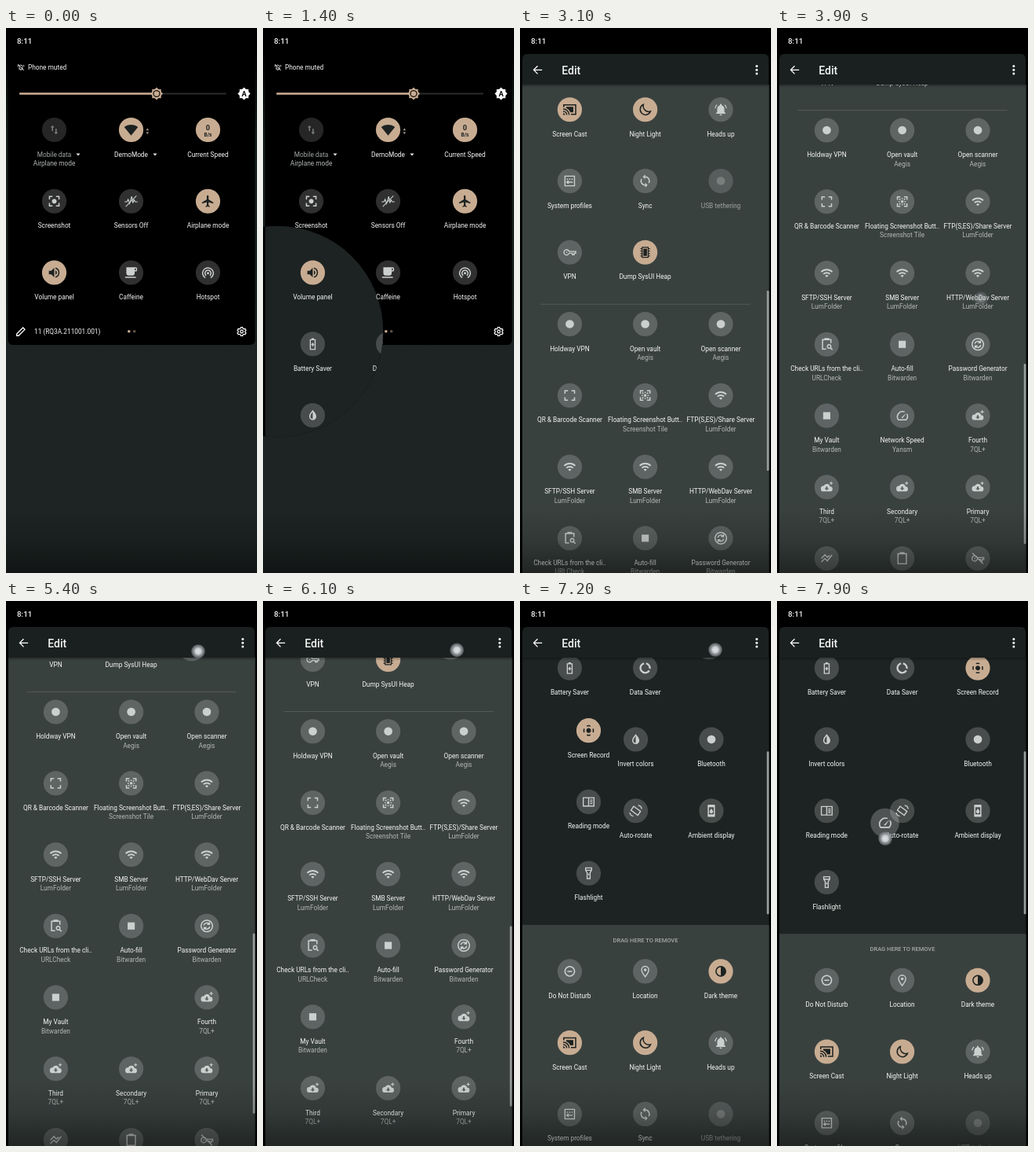
Write an HTML page that moves like this. It is 320x693 px and loops after 8 s.

```html
<!DOCTYPE html>
<html lang="en">
<head>
<meta charset="utf-8">
<title>Quick settings</title>
<style>
  html, body { margin: 0; width: 100%; height: 100%; overflow: hidden; background: #000; }
  svg { display: block; width: 100%; height: 100%; }
  text { font: 8.3px Roboto, sans-serif; fill: #f4f6f5; }
  .mid { text-anchor: middle; }
  .sub { fill: #b2b8b6; }
  .dim { fill: #a0a6a4; }
  .head { font-size: 7.5px; font-weight: 500; fill: #a3a9a7; }
  .title { font-size: 14px; font-weight: 500; }
  .clock { font-size: 9.8px; font-weight: 500; }
  .speed { font-size: 9.2px; font-weight: 700; }
  .unit { font-size: 6.5px; font-weight: 700; }
</style>
</head>
<body>
<svg id="stage" viewBox="0 0 320 693" xmlns="http://www.w3.org/2000/svg">
  <defs>
    <linearGradient id="wall" x2="0" y2="1">
      <stop offset=".04" stop-color="#000"/><stop offset=".2" stop-color="#17201d"/>
      <stop offset=".6" stop-color="#1d2423"/>
    </linearGradient>
    <linearGradient id="fade" x2="0" y2="1">
      <stop offset="0" stop-opacity="0"/><stop offset=".5" stop-opacity=".14"/>
      <stop offset="1" stop-opacity=".42"/>
    </linearGradient>
    <linearGradient id="drop" x2="0" y2="1">
      <stop offset="0" stop-opacity=".3"/><stop offset="1" stop-opacity="0"/>
    </linearGradient>
    <radialGradient id="touch">
      <stop offset="0" stop-color="#dfe2e4"/><stop offset=".4" stop-color="#cdd0d3"/>
      <stop offset=".62" stop-color="#a2a6aa" stop-opacity=".9"/>
      <stop offset="1" stop-color="#777c82" stop-opacity=".6"/>
    </radialGradient>
    <clipPath id="listClip"><rect x="3" y="72" width="314.500" height="621"/></clipPath>
    <clipPath id="revealClip"><circle id="reveal" cx="19" cy="386" r="0"/></clipPath>
  </defs>
</svg>
<script>
const LOOP = 8000, PITCH = 90.75, COLS = [63.4, 159.6, 256];
const ACCENT = '#c8ac92', DARK = '#1c2221', PALE = '#cbd0ce';
const stage = document.getElementById('stage');
const reveal = document.getElementById('reveal');

// f: filled path, s: stroked path, w: stroke width, k: scale, on a 24 unit grid
const corners = 'M4 9V4h5M15 4h5v5M20 15v5h-5M9 20H4v-5';
const keyShape = 'M11 10.5h11v3h-2.5v2.5h-3v-2.500H11a4.500 4.500 0 1 1 0-3zM6 12h2';
const plate = 'M5 4h14v17H5zM9 4V2.500h6V4';
const ring = 'M12 4a8 8 0 1 0 .1 0z';
const disc = { f: 'M12 5a7 7 0 1 0 .1 0z' };
const block = { f: 'M6 6h12v12H6z' };
const icons = {
  data: { f: 'M9 4.500L5.800 8H8v6h2V8h2.200zM15 19.500l3.200-3.500H16v-6h-2v6h-2.200z' },
  fan: { f: 'M12 21.500L.5 7.500C3.500 5 7.500 3.500 12 3.500s8.500 1.500 11.500 4z' },
  focus: { f: 'M12 8a4 4 0 1 0 .1 0z', s: corners },
  sensors: { s: 'M1 13h4l2-4 2.500 7L13 4l2 11 2-6 1.500 4H23M3 21L21 3', w: 1.4 },
  plane: { f: 'M21 16v-2l-8-5V3.500a1.500 1.500 0 0 0-3 0V9l-8 5v2l8-2.500V19l-2 1.500V22l3.500-1 3.500 1v-1.500L13 19v-5.500z' },
  volume: { f: 'M3 9v6h4l5 5V4L7 9zM14 8a4.500 4.500 0 0 1 0 8z', s: 'M14 4.300a8 8 0 0 1 0 15.400' },
  cup: { f: 'M20 3H4v10a4 4 0 0 0 4 4h6a4 4 0 0 0 4-4v-3h2a2 2 0 0 0 2-2V5a2 2 0 0 0-2-2zM20 8h-2V5h2zM2 19h18v2H2z' },
  hotspot: { f: 'M12 11a2 2 0 1 0 .1 0z', s: 'M9 17a5 5 0 1 1 6 0M7.500 20.800a9 9 0 1 1 9 0' },
  battery: { s: 'M8 5h8v16H8zM10 3.500h4M12 10v6M9.500 13h5', w: 1.8 },
  saver: { s: 'M10 4.200a8 8 0 1 0 8.800 12M13.500 4.200a8 8 0 0 1 6.300 9', w: 3 },
  record: { f: 'M12 8a4 4 0 1 0 .1 0z', s: 'M9 4.600a8 8 0 0 1 6 0M19.400 9a8 8 0 0 1 0 6M15 19.400a8 8 0 0 1-6 0M4.600 15a8 8 0 0 1 0-6' },
  invert: { f: 'M12 3c4 4.500 6 7.500 6 11a6 6 0 0 1-12 0c0-3.500 2-6.500 6-11zM12 6v12a4 4 0 0 1-4-4c0-2.500 1.500-5 4-8z' },
  read: { s: 'M3 5h18v14H3zM12 5v14M14.500 9h4M14.500 12h4M14.500 15h4', w: 1.8 },
  rotate: { s: 'M8.500 4.500L20 13l-4.500 6.500L4 11zM16 3a7 7 0 0 1 6 6M8 21a7 7 0 0 1-6-6', w: 1.8 },
  ambient: { f: 'M6.500 2h11v4h-11zM6.500 18h11v4h-11zM12 8l2.600 4a3 3 0 1 1-5.200 0z', s: 'M7 3h10v18H7z' },
  torch: { s: 'M7 3h10v4l-2.500 4v10h-5V11L7 7zM7 7h10M12 12.500v3', w: 1.8 },
  quiet: { s: ring + 'M8 12h8' },
  pin: { f: 'M12 7.300a2.300 2.300 0 1 0 .1 0z', s: 'M12 21c-4-5-6-8-6-11.500a6 6 0 0 1 12 0C18 13 16 16 12 21z', w: 1.8 },
  theme: { f: 'M12 4a8 8 0 0 1 0 16z', s: ring },
  cast: { f: 'M1 18v3h3a3 3 0 0 0-3-3zM6 7.500h12v9h-5a13 13 0 0 0-7-7z', s: 'M2 8V4h20v16h-8M1 15a6 6 0 0 1 6 6M1 11a10 10 0 0 1 10 10' },
  moon: { s: 'M9 3.500a9 9 0 1 0 12 11.500A9.500 9.500 0 0 1 9 3.500z' },
  bell: { f: 'M10 20h4a2 2 0 0 1-4 0zM18 16v-5c0-3-1.600-5.600-4.500-6.300V4a1.500 1.500 0 0 0-3 0v.7C7.600 5.400 6 8 6 11v5l-2 2v1h16v-1z', s: 'M2.500 10a8 8 0 0 1 3-6M21.500 10a8 8 0 0 0-3-6', w: 1.6 },
  profile: { s: 'M4 4h16v16H4zM7 9h2M11 9h2M15 9h2M7 14h10M10 11.500L7 14l3 2.500', w: 1.8 },
  sync: { f: 'M12 1v8L8 5zM12 23v-8l4 4z', s: 'M12 5a7 7 0 0 1 6 10.500M12 19a7 7 0 0 1-6-10.500' },
  key: { s: keyShape, w: 1.8 },
  chip: { f: 'M9 6h6v12H9z', s: 'M7 3.500h10v17H7zM4 6h3M4 10h3M4 14h3M4 18h3M17 6h3M17 10h3M17 14h3M17 18h3', w: 1.6 },
  frame: { s: corners },
  grab: { f: 'M10 10h4v4h-4zM11 6h2v2h-2zM11 16h2v2h-2zM6 11h2v2H6zM16 11h2v2h-2z', s: corners + 'M7 7l2 2M17 7l-2 2M7 17l2-2M17 17l-2-2' },
  arcs: { f: 'M1 9l2 2a12.700 12.700 0 0 1 18 0l2-2A15.600 15.600 0 0 0 1 9zM9 17l3 3 3-3a4.300 4.300 0 0 0-6 0zM5 13l2 2a7.100 7.100 0 0 1 10 0l2-2a9.900 9.900 0 0 0-14 0z', k: .7 },
  lookup: { s: 'M19 10V4H5v16h6M9 4V2.500h6V4M16 12.500a3 3 0 1 0 .1 0M18.500 18l3 3' },
  renew: { s: 'M12 2.500a9.500 9.500 0 1 0 .1 0zM7 11a5 5 0 0 1 9-2M17 13a5 5 0 0 1-9 2M16.500 5.500v4h-4M7.500 18.500v-4h4' },
  gauge: { f: 'M10.600 15.400a2 2 0 0 0 2.800 0l6-8.500z', s: 'M20 9a9 9 0 0 1-1.500 10h-13A9 9 0 0 1 16 5.500' },
  cloud: { f: 'M18 11a6 6 0 0 0-11.500-1A5 5 0 0 0 6 20h12a4.500 4.500 0 0 0 0-9zM12 18l-4-4h2.500v-3h3v3H16z', s: 'M20 2v6M17 5h6', w: 1.5, k: .7 },
  chart: { s: 'M3 18l6-6 4 4 8-10M3 12l6-6 4 4 4-3' },
  board: { s: plate },
  keyOff: { s: keyShape + 'M3 3l18 18', w: 1.8 },
  pencil: { s: 'M4 20v-3.500L16 4.500 19.500 8 7.500 20z' },
  gear: { s: 'M10 3h4l.6 2.600 2 1.100 2.500-.8 2 3.400-1.900 1.800v2l1.900 1.800-2 3.400-2.500-.8-2 1.100L14 21h-4l-.6-2.400-2-1.100-2.500.8-2-3.400 1.900-1.800v-2L2.900 9.300l2-3.400 2.500.8 2-1.100zM12 9a3 3 0 1 0 .1 0z' },
  mute: { s: 'M6 17h12M7.500 17v-7a4.500 4.500 0 0 1 9 0v7M3 3l18 18M10.500 20h3M3 10a7 7 0 0 1 2-5M21 10a7 7 0 0 0-2-5' },
  back: { s: 'M21 12H4M12 4l-8 8 8 8' }
};

// [icon, label, second line, state]
const current = [
  ['data', 'Mobile data', '', 'dim'], ['fan', 'Wi-Fi', '', 'on'], ['157', 'Current Speed', '', 'on'],
  ['focus', 'Screenshot'], ['sensors', 'Sensors Off'], ['plane', 'Airplane mode', '', 'on'],
  ['volume', 'Volume panel', '', 'on'], ['cup', 'Caffeine'], ['hotspot', 'Hotspot'],
  ['battery', 'Battery Saver'], ['saver', 'Data Saver'], ['record', 'Screen Record', '', 'on'],
  ['invert', 'Invert colors'], [disc, 'Bluetooth'], ['read', 'Reading mode'],
  ['rotate', 'Auto-rotate'], ['ambient', 'Ambient display'], ['torch', 'Flashlight']
];
const system = [
  ['quiet', 'Do Not Disturb'], ['pin', 'Location'], ['theme', 'Dark theme', '', 'on'],
  ['cast', 'Screen Cast', '', 'on'], ['moon', 'Night Light', '', 'on'], ['bell', 'Heads up'],
  ['profile', 'System profiles'], ['sync', 'Sync'], [disc, 'USB tethering', '', 'dim'],
  ['key', 'VPN'], ['chip', 'Dump SysUI Heap', '', 'on']
];
const apps = [
  [disc, 'Holdway VPN'], [disc, 'Open vault', 'Aegis'], [disc, 'Open scanner', 'Aegis'],
  ['frame', 'QR & Barcode Scanner'], ['grab', 'Floating Screenshot Butt..', 'Screenshot Tile'], ['arcs', 'FTP(S,ES)/Share Server', 'LumFolder'],
  ['arcs', 'SFTP/SSH Server', 'LumFolder'], ['arcs', 'SMB Server', 'LumFolder'], ['arcs', 'HTTP/WebDav Server', 'LumFolder'],
  ['lookup', 'Check URLs from the cli..', 'URLCheck'], [block, 'Auto-fill', 'Bitwarden'], ['renew', 'Password Generator', 'Bitwarden'],
  [block, 'My Vault', 'Bitwarden'], ['gauge', 'Network Speed', 'Yansm'], ['cloud', 'Fourth', '7QL+'],
  ['cloud', 'Third', '7QL+'], ['cloud', 'Secondary', '7QL+'], ['cloud', 'Primary', '7QL+'],
  ['chart', ''], ['board', ''], ['keyOff', '']
];
const DRAGGED = 13;

function el(parent, tag, attrs = {}, content) {
  const node = document.createElementNS(stage.namespaceURI, tag);
  for (const name in attrs) node.setAttribute(name, attrs[name]);
  if (content) node.textContent = content;
  return parent.appendChild(node);
}
const rect = (p, x, y, width, height, fill, rx = 0) => el(p, 'rect', { x, y, width, height, fill, rx });
const circle = (p, cx, cy, r, fill) => el(p, 'circle', { cx, cy, r, fill });
const text = (p, x, y, str, cls = '') => el(p, 'text', { x, y, class: cls }, str);
const place = (node, x, y) => node.setAttribute('transform', `translate(${x} ${y})`);

function glyph(parent, icon, x, y, color, scale) {
  const { f, s, w = 2, k = .76 } = icons[icon] || icon;
  const g = el(parent, 'g', { transform: `translate(${x} ${y}) scale(${scale || k}) translate(-12 -12)` });
  if (f) el(g, 'path', { d: f, fill: color, 'fill-rule': 'evenodd' });
  if (s) el(g, 'path', { d: s, fill: 'none', stroke: color, 'stroke-width': w });
}

function tile(parent, [icon, label, sub, state], x, y) {
  const g = el(parent, 'g');
  const on = state === 'on', dim = state === 'dim';
  place(g, x, y);
  circle(g, 0, 0, 15.6, on ? ACCENT : '#fff').setAttribute('fill-opacity', on ? 1 : dim ? .15 : .19);
  if (/^\d+$/.test(icon)) {
    text(g, 0, .8, icon, 'mid speed').style.fill = DARK;
    text(g, 0, 8.2, 'B/s', 'mid unit').style.fill = DARK;
  } else glyph(g, icon, 0, 0, on ? DARK : dim ? '#787e7c' : PALE);
  text(g, 0, 34, label, dim ? 'mid dim' : 'mid');
  if (sub) text(g, 0, 45.5, sub, 'mid sub');
  return g;
}
const slotX = i => COLS[i % 3];
const slotY = i => 129.5 + PITCH * Math.floor(i / 3);

// quick settings panel
rect(stage, 0, 0, 320, 693, 'url(#wall)');
const panel = rect(stage, 2.5, -10, 315, 413, '#000', 6);
glyph(stage, 'mute', 19, 50, '#e6e9e8', .44);
text(stage, 28, 53.200, 'Phone muted');
const quick = el(stage, 'g');
rect(quick, 17, 82.5, 264, 2, '#2b2d2c', 1);
rect(quick, 17, 82.3, 175, 2.4, ACCENT, 1);

function badge(x, y, r, color) {
  for (const turn of [0, 45]) {
    rect(quick, x - r, y - r, 2 * r, 2 * r, color).setAttribute('transform', `rotate(${turn} ${x} ${y})`);
  }
}
badge(192, 83.5, 5.7, ACCENT);
circle(quick, 192, 83.5, 4.6, '#15130f');
circle(quick, 192, 83.5, 3.3, ACCENT);
badge(303.5, 83.5, 5.7, '#fff');
text(quick, 303.5, 86.8, 'A', 'mid speed').style.fill = '#000';

const demo = ['fan', 'DemoMode', '', 'on'], still = ['0', 'Current Speed', '', 'on'];
const firstPage = [['data', 'Mobile data', 'Airplane mode', 'dim'], demo, still, ...current.slice(3, 9)];
firstPage.forEach((t, i) => tile(quick, t, 61.5 + 98 * (i % 3), slotY(i)));
for (const x of [92, 190]) el(quick, 'path', { d: `M${x - 2.5} 159.500h5l-2.500 3z`, fill: '#e6e9e8' });
el(quick, 'path', { d: 'M178.500 130.300h3.600l-1.800-3zM178.500 132.300h3.600l-1.800 3z', fill: '#9a9186' });
glyph(quick, 'pencil', 19, 386, '#fff', .66);
text(quick, 36, 389, '11 (RQ3A.211001.001)');
circle(quick, 156.8, 385.7, 1.8, ACCENT);
circle(quick, 163.7, 385.7, 1.8, '#5d534a');
glyph(quick, 'gear', 300.5, 386, '#fff', .6);

// edit screen
const edit = el(stage, 'g', { 'clip-path': 'url(#revealClip)' });
rect(edit, 0, 33, 320, 660, '#020303');
const view = el(edit, 'g', { 'clip-path': 'url(#listClip)' });
rect(view, 0, 72, 320, 621, '#1d2322');
const list = el(view, 'g');
text(list, 160, 91.200, 'HOLD AND DRAG TO REARRANGE TILES', 'mid head');
const others = el(list, 'g');
rect(others, 0, 649, 320, 1300, '#39413f');
const hint = text(others, 160, 670.700, 'HOLD AND DRAG TO ADD TILES', 'mid head');
const currentTiles = current.map((t, i) => tile(list, t, slotX(i), slotY(i)));
system.forEach((t, i) => tile(others, t, slotX(i), 578.5 + slotY(i)));
rect(others, 26.5, 1045.8, 267, .8, '#5a6260');
const appTiles = apps.map((t, i) => tile(others, t, slotX(i), 942 + slotY(i)));

const held = el(view, 'g');
circle(held, 0, 0, 18.3, '#fff').setAttribute('fill-opacity', .22);
glyph(held, 'gauge', 0, 0, PALE, .84);

rect(edit, 3, 72, 314, 4, 'url(#drop)');
el(edit, 'path', { d: 'M3 72V39a6 6 0 0 1 6-6h302a6 6 0 0 1 6 6v33z', fill: '#1a201f' });
glyph(edit, 'back', 22.5, 53.3, '#fff', .63);
text(edit, 53.3, 58.700, 'Edit', 'title');
for (const y of [48.5, 53.2, 57.9]) circle(edit, 301.8, y, 1.5, '#fff');
const bar = rect(edit, 314.7, 72, 2.7, 229, '#999f9d', 1);

rect(stage, 0, 610, 320, 83, 'url(#fade)');
text(stage, 14, 20.400, '8:11', 'clock');
const dot = circle(stage, 0, 0, 8.8, 'url(#touch)');

// time, x, y, opacity
const fingerPath = [
  [1100, 19, 386, 0], [1200, 19, 386, 1], [1300, 19, 386, 1], [1400, 19, 386, 0],
  [2200, 227, 531, 0], [2300, 227, 531, 1], [2400, 229, 502, 1], [2600, 243, 110, 1], [2700, 246, 28, 1], [2800, 246, 28, 0],
  [3100, 252, 285, 0], [3200, 252, 280, 1], [3400, 258, 80, 1], [3500, 260, 28, 1], [3600, 260, 28, 0],
  [3800, 260, 344, 0], [3900, 260, 344, .4], [4000, 260, 344, .8], [4100, 168, 498, 1],
  [4400, 168, 498, 1], [4600, 173, 440, 1], [4900, 215, 200, 1], [5200, 240, 76, 1], [5400, 245, 64, 1],
  [6700, 249, 61, 1], [7200, 249, 62, 1], [7400, 230, 110, 1], [7650, 180, 220, 1], [7900, 138, 302, 1]
];
const scrollPath = [
  [2300, 0], [2400, 22], [2600, 405], [2700, 500], [2800, 585], [2900, 640], [3000, 675], [3100, 695],
  [3200, 700], [3400, 880], [3500, 925], [3600, 934], [3900, 941.5], [4900, 941.5], [5400, 930.5],
  [6000, 912], [6400, 887], [6700, 850.5], [6850, 740], [7000, 570], [7200, 316.5]
];
const offsetPath = [[7200, 8, 6], [7900, .5, 20]];

const mix = (a, b, k) => a + (b - a) * k;
const ramp = (t, from, span) => Math.min(1, Math.max(0, (t - from) / span));
const ease = k => 1 - (1 - k) ** 3;

function sample(path, t) {
  const next = path.findIndex(p => p[0] > t);
  if (next < 0) return path[path.length - 1].slice(1);
  if (!next) return path[0].slice(1);
  const a = path[next - 1], b = path[next];
  return a.slice(1).map((v, i) => mix(v, b[i + 1], (t - a[0]) / (b[0] - a[0])));
}

function draw(t) {
  const sag = t < 700 ? 25 * Math.sin(Math.PI * t / 700) : 0;
  panel.setAttribute('height', 413 + sag);
  place(quick, 0, sag);
  reveal.setAttribute('r', 560 * ramp(t, 1200, 600) ** 1.3);

  const [x, y, opacity] = sample(fingerPath, t);
  place(dot, x, y);
  dot.setAttribute('opacity', opacity);

  const [scroll] = sample(scrollPath, t);
  place(list, 0, -scroll);
  bar.setAttribute('y', 72 + .377 * scroll);
  bar.setAttribute('height', t < 7200 ? 229 : 207);

  // a gap opens at slot 11, then moves on to slot 13
  const open = ease(ramp(t, 7100, 200)), shift = ease(ramp(t, 7500, 200));
  currentTiles.forEach((g, i) => {
    const k = i >= 13 ? open : i >= 11 ? open * (1 - shift) : 0;
    place(g, mix(slotX(i), slotX(i + 1), k), mix(slotY(i), slotY(i + 1), k));
  });
  place(others, 0, PITCH * open);

  const dragging = t >= 4400;
  const [dx, dy] = sample(offsetPath, t);
  place(held, x - dx, y - dy);
  held.style.display = dragging ? '' : 'none';
  appTiles[DRAGGED].style.display = dragging ? 'none' : '';
  hint.textContent = dragging ? 'DRAG HERE TO REMOVE' : 'HOLD AND DRAG TO ADD TILES';
}

const start = performance.now();
function tick() {
  const t = (performance.now() - start) % LOOP;
  draw(Math.floor(t / 100) * 100);
  requestAnimationFrame(tick);
}
tick();
</script>
</body>
</html>
```
